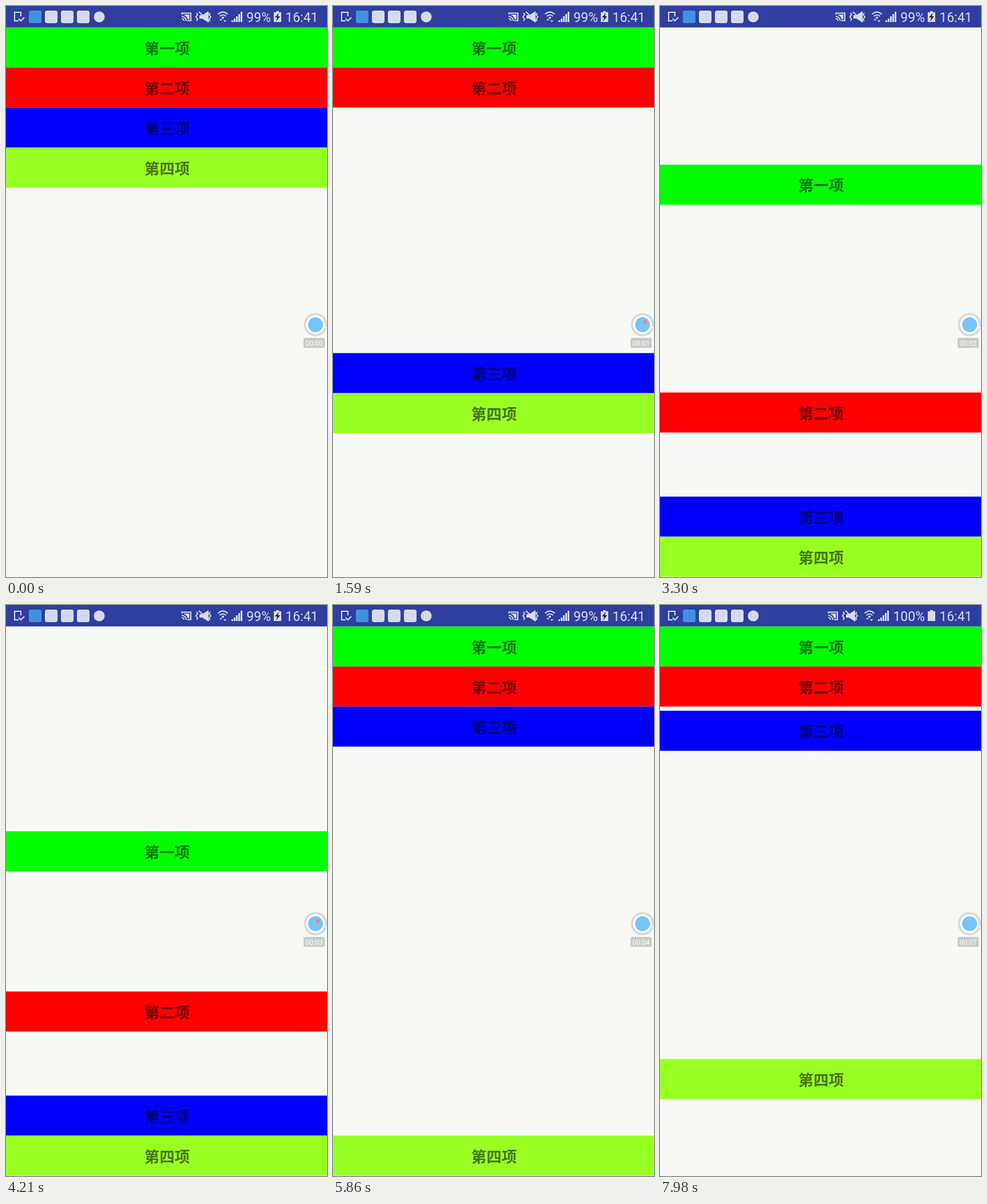
These frames come from a looping animation (561x998 px, 8000 ms). An HTML page:

```html
<!DOCTYPE html>
<html lang="zh-CN">
<head>
<meta charset="utf-8">
<title>抽屉列表</title>
<style>
  html, body { margin: 0; width: 100%; height: 100%; overflow: hidden; background: #f6f9f4; }
  svg { display: block; width: 100%; height: 100%; }
  .bar text { font: bold 26.5px "Noto Sans CJK SC", "Noto Sans CJK", sans-serif; text-anchor: middle; fill: #000; fill-opacity: .54; }
  .status { fill: #d6daed; }
  .status text { font: 23px Roboto, sans-serif; text-anchor: end; }
  .line { fill: none; stroke: #d6daed; stroke-width: 2; }
  #clock { font: 12px Roboto, sans-serif; text-anchor: middle; fill: #fff; }
</style>
</head>
<body>
<svg viewBox="0 0 561 998" preserveAspectRatio="none">
  <rect width="561" height="998" fill="#f6f9f4"/>
  <g id="bars"></g>

  <rect width="561" height="37.500" fill="#303f9f"/>
  <g class="status">
    <path class="line" d="M26 18V11H15V26H22M22 22l4 4 6-6"/>
    <rect x="40" y="8" width="22" height="22" rx="3" fill="#3f92e0"/>
    <rect x="68" y="8" width="22" height="22" rx="4"/>
    <rect x="96" y="8" width="22" height="22" rx="4"/>
    <rect x="124" y="8" width="22" height="22" rx="4"/>
    <circle cx="163" cy="19" r="9.500"/>

    <g id="signals">
      <path class="line" d="M307.500 15V12.500H323V25.500H317"/>
      <path class="line" d="M307 18a8 8 0 0 1 8 8M307 22a4 4 0 0 1 4 4"/>
      <path d="M311 15h9.500v8h-3q-2-6-6.500-7z"/>
      <path d="M338 16h5l11-7v20l-11-7h-5z"/>
      <path class="line" d="M337 10l18 17"/>
      <path class="line" stroke-width="1.500" d="M333 12l2 3-3 4 3 4-2 3M357 12l-2 3 3 4-3 4 2 3"/>
      <path class="line" d="M370.500 14.500q8.500-8 17 0M373.500 18q5.500-5 11 0"/>
      <circle cx="379" cy="20.500" r="2"/>
      <path d="M373 25l2.500-3 2.500 3zM380 25h5l-2.500 3z"/>
      <path d="M394 25h3v3h-3zM398 22h3v6h-3zM402 18h3v10h-3zM406 14h3v14h-3zM410 10h3v18h-3z"/>
    </g>
    <text id="charge" x="463" y="27.500"></text>
    <path d="M472 9h5v2h4v17h-13v-17h4z"/>
    <path id="bolt" fill="#1a2050" d="M477 12l-7 8h4l-2 7 7-9h-4z"/>
    <text x="545.500" y="27.500">16:41</text>
  </g>

  <circle cx="541" cy="557" r="20.500" fill="#d8dbd6"/>
  <circle cx="541" cy="557" r="16.500" fill="#fbfcfb"/>
  <circle cx="541" cy="557" r="13" fill="#76c5f8"/>
  <circle cx="558" cy="562" r="2" fill="#fbfcfb"/>
  <circle id="blink" cx="545.500" cy="552.500" r="3.200" fill="#f47b7b"/>
  <rect x="520" y="580" width="37" height="17.500" rx="3" fill="#c9ccc8"/>
  <text id="clock" x="538.500" y="593.500"></text>
</svg>
<script>
const LOOP = 8000, BAR = 70, TOP = 37.5;
const FULL_AT = 7420;
const FIRST_TICK = 1020, TICK = 1325;
const byId = id => document.getElementById(id);
const smooth = p => p * p * (3 - 2 * p);
const accelerate = p => p ** 1.6;

const items = [['第一项', '#00ff00'], ['第二项', '#ff0000'], ['第三项', '#0000ff'], ['第四项', '#99ff22']];
byId('bars').innerHTML = items.map(([label, color]) =>
  `<g class="bar"><rect width="561" height="${BAR}" fill="${color}"/><text x="281.5" y="46">${label}</text></g>`).join('');
const bars = [...document.querySelectorAll('.bar')];

const drags = [
  { bar: 2, start: 1231, length: 480, to: 857.5, ease: accelerate },
  { bar: 1, start: 2080, length: 570, to: 675.5 },
  { bar: 0, start: 2981, length: 520, to: 395.5 },
  { bar: 1, start: 4360, length: 570, to: 322.5 },
  { bar: 2, start: 5171, length: 600, to: 177.5 },
  { bar: 3, start: 5980, length: 550, to: 247.5 },
  { bar: 3, start: 7000, length: 650, to: 793.5 },
  { bar: 2, start: 7946, length: 500, to: 700 }
];

// A dragged bar pushes every neighbour it meets.
function barPositions(time) {
  let tops = items.map((_, i) => TOP + i * BAR);
  for (const { bar, start, length, to, ease = smooth } of drags) {
    if (time <= start) break;
    const progress = ease(Math.min(1, (time - start) / length));
    const y = tops[bar] + (to - tops[bar]) * progress;
    tops = tops.map((top, i) => {
      const limit = y + (i - bar) * BAR;
      return i === bar ? y : i < bar ? Math.min(top, limit) : Math.max(top, limit);
    });
  }
  return tops;
}

function draw(time) {
  barPositions(time).forEach((y, i) => bars[i].setAttribute('transform', `translate(0 ${y})`));

  const ticks = Math.floor((time - FIRST_TICK) / TICK) + 1;
  const seconds = ticks > 0 ? Math.floor((FIRST_TICK + (ticks - 1) * TICK) / 1000) : 0;
  byId('clock').textContent = `00:0${seconds}`;
  byId('blink').style.display = ticks % 2 ? '' : 'none';

  const full = time >= FULL_AT;
  byId('charge').textContent = full ? '100%' : '99%';
  byId('bolt').style.display = full ? 'none' : '';
  byId('signals').setAttribute('transform', `translate(${full ? -13 : 0} 0)`);
}

const began = performance.now();
function frame() {
  draw((performance.now() - began) % LOOP);
  requestAnimationFrame(frame);
}
frame();
</script>
</body>
</html>
```
